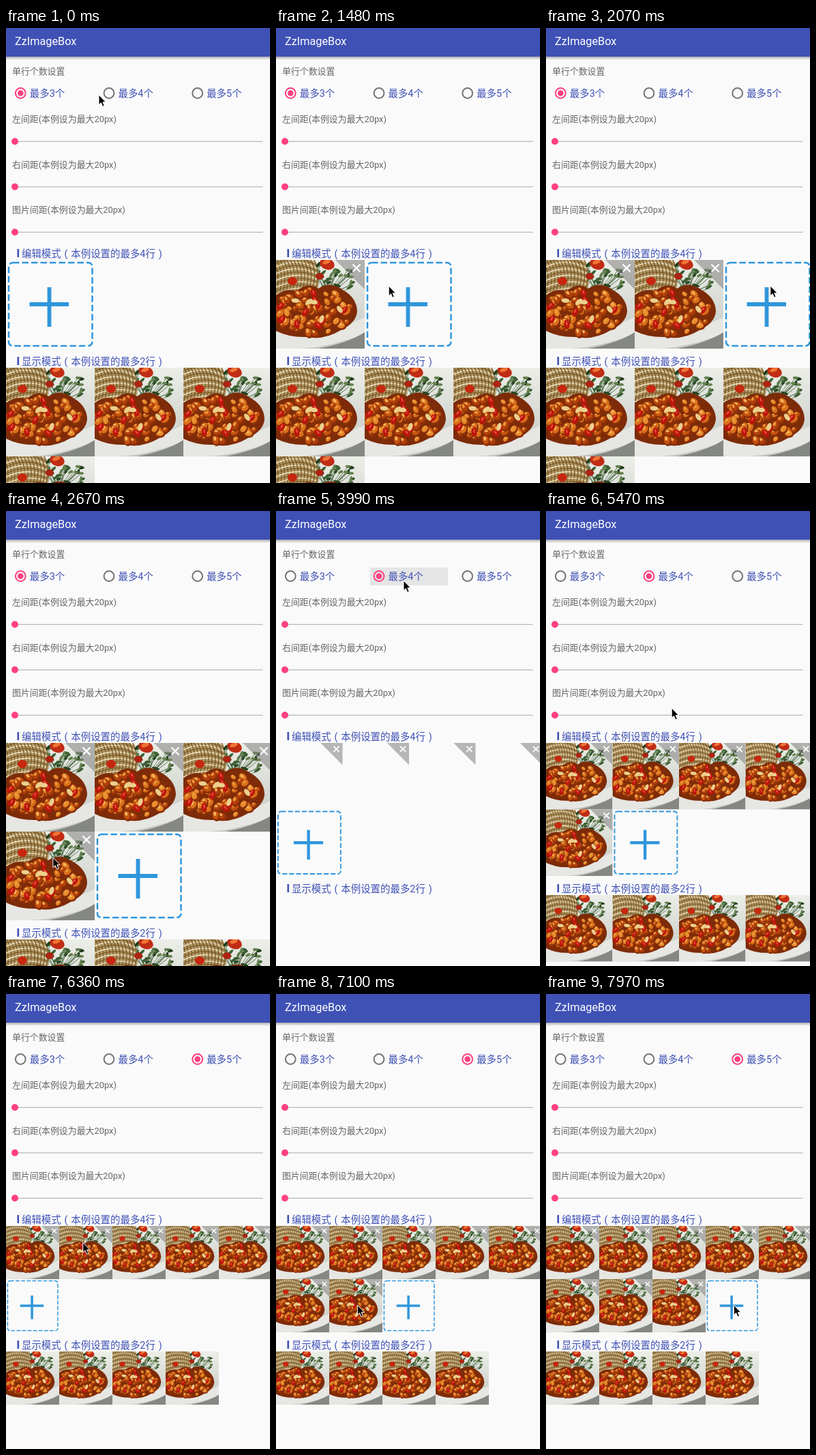
An HTML page for the animation above (8000 ms loop, 387 by 667 pixels).

```html
<!DOCTYPE html>
<html lang="zh-CN">
<head>
<meta charset="utf-8">
<title>ZzImageBox</title>
<style>
  html, body { margin: 0; width: 100%; height: 100%; overflow: hidden; background: #fafafa; }
  svg { display: block; }
  text { font-family: Roboto, "Noto Sans CJK SC", "Noto Sans CJK", sans-serif; }
  .label { font-size: 12.9px; fill: #666; }
  .link { font-size: 14.45px; fill: #3f51b5; word-spacing: 1.2px; }
  .title { font-size: 16.25px; fill: #fff; }
  .ring { fill: none; stroke: #757575; stroke-width: 2; }
  .on .ring { stroke: #ff4081; }
  .dot { fill: #ff4081; visibility: hidden; }
  .on .dot { visibility: visible; }
  .press { fill: #e5e5e5; visibility: hidden; }
  .down .press { visibility: visible; }
  .add { fill: none; stroke: #2f96dc; }
</style>
</head>
<body>
<svg id="stage" width="387" height="667" viewBox="0 0 387 667">
  <defs>
    <linearGradient id="shade" x2="0" y2="1">
      <stop offset="0" stop-color="#000" stop-opacity=".3"/>
      <stop offset="1" stop-color="#000" stop-opacity="0"/>
    </linearGradient>
    <linearGradient id="wall" x2="0" y2="1">
      <stop offset="0" stop-color="#eceee8"/>
      <stop offset="1" stop-color="#c3c6c1"/>
    </linearGradient>
    <symbol id="photo" viewBox="0 0 130 130"></symbol>
    <g id="close">
      <path d="M87 0H130V43Z" fill="#808080" fill-opacity=".55"/>
      <path d="M112.5 6.5l11 11m0-11l-11 11" stroke="#fff" stroke-width="2.3"/>
    </g>
    <g id="add" class="add">
      <rect x="4" y="4" width="122.5" height="122" rx="6" stroke-width="2.5" stroke-dasharray="9.5 4"/>
      <path d="M34.5 65H92M63.5 40V98" stroke-width="5.8"/>
    </g>
  </defs>
  <rect width="387" height="667" fill="#fafafa"/>
  <rect y="42" width="387" height="5" fill="url(#shade)"/>
  <rect width="387" height="42" fill="#3f51b5"/>
  <text class="title" x="13" y="25">ZzImageBox</text>
  <text class="label" x="9" y="67.5">单行个数设置</text>
  <g id="form"></g>
  <g id="boxes"></g>
  <path id="cursor" d="M0 0V14.6L3.3 11.6 5.7 17.2 8.2 16.1 5.9 10.7H10.3Z" fill="#000" stroke="#fff" stroke-width="1"/>
</svg>
<script>
const $ = id => document.getElementById(id);
const LOOP = 8000, TICK = 147.59, WIDTH = 390, TOP = 340;

function makePhoto() {
  let seed = 11;
  const rnd = (a, b) => {
    seed = (seed * 16807) % 2147483647;
    return a + (b - a) * seed / 2147483647;
  };
  const pick = list => list[Math.floor(rnd(0, list.length))];
  const blob = (x, y, rx, ry, turn, fill) =>
    `<ellipse rx="${rx.toFixed(1)}" ry="${ry.toFixed(1)}" fill="${fill}"
      transform="translate(${x.toFixed(1)} ${y.toFixed(1)}) rotate(${turn.toFixed(0)})"/>`;
  const shape = (d, fill) => `<path d="${d}" fill="${fill}"/>`;
  const line = (d, color, w) => `<path d="${d}" fill="none" stroke="${color}" stroke-width="${w}"/>`;
  // a point spread evenly over the dish
  const onDish = (rx, ry) => {
    const a = rnd(0, 2 * Math.PI), r = Math.sqrt(rnd(0, 1));
    return [55 + Math.cos(a) * r * rx, 77 + Math.sin(a) * r * ry];
  };

  let s = shape('M0 0H130V130H0Z', 'url(#wall)');
  // woven basket
  s += shape('M0 0H56Q68 22 60 48L0 62Z', '#b59a66');
  for (let i = 0; i < 13; i++) {
    s += line(`M${i * 5 - 4} 0Q${i * 5 + 8} 22 ${i * 4.5} 52`, '#6f5226', 1.2);
    s += line(`M0 ${i * 5}Q30 ${i * 5 - 14} 60 ${i * 4 + 4}`, i % 2 ? '#80602f' : '#f1e6c6', 1.4);
  }
  // herbs and flowers
  for (let i = 0; i < 26; i++) {
    const x = rnd(62, 112), y = rnd(6, 40);
    s += line(`M80 46Q${x - 7} ${y + 9} ${x} ${y}`, pick(['#51704a', '#38552f']), .8);
    s += blob(x, y, rnd(3, 6), 2, rnd(-80, 20), pick(['#3c5f33', '#64804f', '#1f3c1b']));
  }
  s += blob(75, 6, 11, 8, 20, '#c02c14') + blob(74, 3, 6, 3, -20, '#ef7434');
  s += blob(64, 24, 6, 5, 0, '#ad2412') + blob(24, 31, 7, 6, 0, '#c7260f');
  // plate
  s += shape('M0 98Q50 122 130 84V108Q80 128 36 130H0Z', '#e6e6e2');
  s += shape('M62 130Q105 122 130 106V130Z', '#858783');
  // food
  s += shape('M0 52Q14 40 30 46Q45 32 62 42Q80 30 98 44Q118 55 119 75Q118 92 95 103Q70 118 45 113Q20 114 0 104Z', '#7d2b08');
  for (let i = 0; i < 75; i++) {
    const [x, y] = onDish(58, 33), r = rnd(4, 8), turn = rnd(0, 180);
    s += blob(x + 1, y + 2, r, r * .7, turn, '#8a2f08');
    s += blob(x, y, r * .85, r * .6, turn, pick(['#d9701a', '#c4520f', '#e88a2b', '#b2400c']));
    s += blob(x - 1, y - 1.5, r * .4, r * .25, turn, pick(['#f6b45c', '#ec9a3c']));
  }
  for (let i = 0; i < 11; i++) {
    const [x, y] = onDish(54, 30), turn = rnd(0, 180);
    s += blob(x, y, 6.5, 4, turn, '#bd160c') + blob(x, y - 1.5, 3, 1, turn, '#ec5a45');
  }
  for (let i = 0; i < 5; i++) {
    const [x, y] = onDish(40, 24);
    s += blob(x, y, 6, 3.3, rnd(0, 180), '#ecd08c');
  }
  return s;
}

const radioX = n => 21.3 + (n - 3) * 129.7;

const radio = n => `<g id="radio${n}">
  <rect class="press" x="${radioX(n) - 13}" y="83" width="114" height="26"/>
  <circle class="ring" cx="${radioX(n)}" cy="95.5" r="7.4"/>
  <circle class="dot" cx="${radioX(n)}" cy="95.5" r="4.3"/>
  <text class="link" x="${radioX(n) + 13.5}" y="101">最多${n}个</text></g>`;

const slider = (name, i) => {
  const y = 166.3 + i * 66.5;
  return `<text class="label" x="9" y="${y - 28}">${name}(本例设为最大20px)</text>
    <path d="M13 ${y}H376.5" stroke="#b9b9b9" stroke-width="1.3"/>
    <circle cx="13" cy="${y}" r="5" fill="#ff4081"/>`;
};

const heading = (name, rows, y) => `<rect x="16.5" y="${y - 16}" width="2.6" height="12" fill="#3f51b5"/>
  <text class="link" x="23" y="${y - 4}">${name}模式 ( 本例设置的最多${rows}行 )</text>`;

const photo = '<use href="#photo" width="130" height="130"/>';

function place(i, n, top) {
  const size = WIDTH / n;
  return { x: i % n * size, y: top + Math.floor(i / n) * size, size };
}

function cell(i, n, top, content) {
  const { x, y, size } = place(i, n, top);
  return `<g transform="translate(${x} ${y}) scale(${size / 130})">${content}</g>`;
}

function boxes({ n, count, pressed }) {
  const image = pressed ? '' : photo;
  const showTop = place(count, n, TOP).y + WIDTH / n + 28;
  let s = heading('编辑', 4, TOP) + heading('显示', 2, showTop);
  for (let i = 0; i < count; i++) s += cell(i, n, TOP, image + '<use href="#close"/>');
  s += cell(count, n, TOP, '<use href="#add"/>');
  for (let i = 0; i < 4; i++) s += cell(i, n, showTop, image);
  return s;
}

// clicks: a column count picks a radio, otherwise a picture is added
const clicks = [
  { at: 7 }, { at: 12 }, { at: 15 }, { at: 18 }, { at: 27, pick: 4 }, { at: 34 },
  { at: 40, pick: 5 }, { at: 45 }, { at: 48 }, { at: 52 }, { at: 55 }
];

function stateAt(tick) {
  const state = { n: 3, count: 0, pressed: false };
  for (const { at, pick } of clicks) {
    if (at > tick) break;
    if (pick) state.n = pick;
    else state.count++;
    state.pressed = Boolean(pick) && at === tick;
  }
  return state;
}

// where the pointer rests for a click
function spot({ at, pick }) {
  if (pick) return [radioX(pick) + 36, 102];
  const { n, count } = stateAt(at - 1);
  const { x, y, size } = place(count, n, TOP);
  return [x + size * .53, y + 38];
}

// it arrives one tick before a click and leaves one tick after
function pointer(tick) {
  const i = clicks.findIndex(c => c.at + 1 > tick);
  const prev = clicks[i - 1], next = clicks[i];
  const from = prev ? spot(prev) : [136, 98], to = spot(next);
  const leave = prev ? prev.at + 1 : 0;
  const k = Math.min(1, (tick - leave) / (next.at - 1 - leave));
  const ease = k * k * (3 - 2 * k);
  return from.map((v, axis) => v + (to[axis] - v) * ease);
}

$('photo').innerHTML = makePhoto();
$('form').innerHTML = [3, 4, 5].map(radio).join('') +
  ['左间距', '右间距', '图片间距'].map(slider).join('');

let lastTick, lastKey;
function draw(now) {
  const tick = Math.floor(now % LOOP / TICK);
  if (tick === lastTick) return;
  lastTick = tick;
  const state = stateAt(tick), key = JSON.stringify(state);
  if (key !== lastKey) {
    lastKey = key;
    $('boxes').innerHTML = boxes(state);
    for (const n of [3, 4, 5]) {
      $('radio' + n).classList.toggle('on', state.n === n);
      $('radio' + n).classList.toggle('down', state.n === n && state.pressed);
    }
  }
  $('cursor').setAttribute('transform', `translate(${pointer(tick)})`);
}

const start = performance.now();
function loop() {
  draw(performance.now() - start);
  requestAnimationFrame(loop);
}
loop();
</script>
</body>
</html>
```
